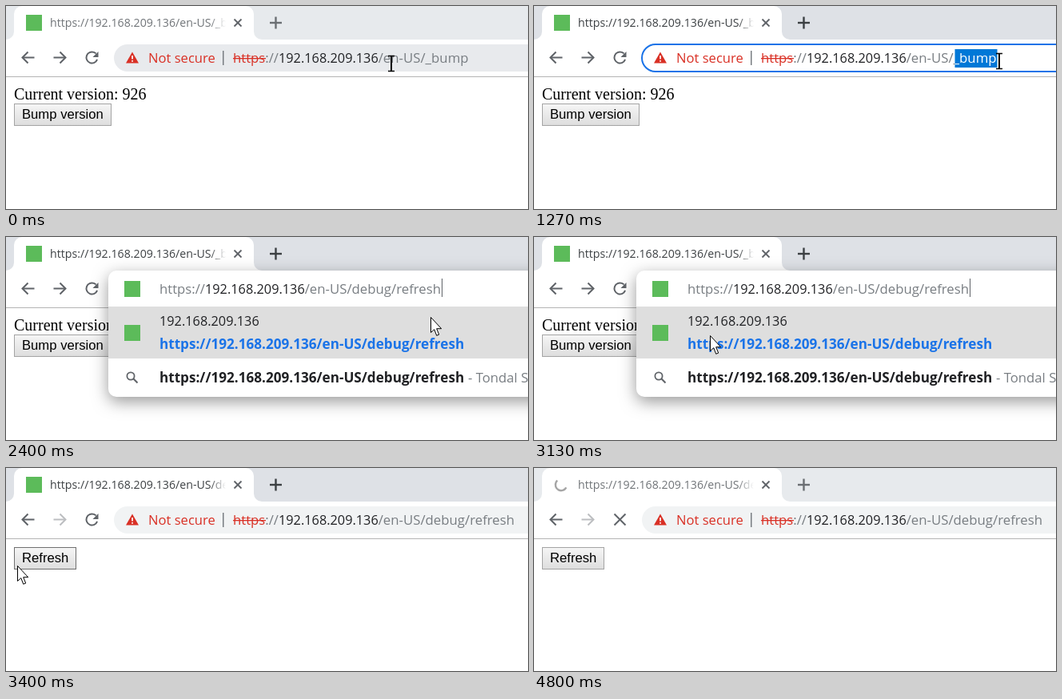
An HTML page with a canvas for the animation above (4.87 s loop, 653 by 254 pixels).

```html
<!DOCTYPE html>
<html lang="en">
<head>
<meta charset="utf-8">
<title>Version bump</title>
<style>
html, body { margin: 0; width: 100%; height: 100%; overflow: hidden; background: #fff; }
canvas { display: block; width: 653px; height: 254px; }
</style>
</head>
<body>
<canvas id="stage"></canvas>
<script>
const W = 653, H = 254, LOOP = 4870, TICKS_PER_MS = 0.015;
const canvas = document.getElementById('stage');
const ctx = canvas.getContext('2d');
const dpr = window.devicePixelRatio || 1;
canvas.width = W * dpr;
canvas.height = H * dpr;

const UI = '"Open Sans", "Noto Sans", sans-serif';
const SERIF = '"Liberation Serif", serif';
const SANS = '"Liberation Sans", sans-serif';
const INK = '#202124', GRAY = '#787d82', ICON = '#5f6368';
const RED = '#d93025', BLUE = '#1a73e8', GREEN = '#5cbb5a';
const HOST = '192.168.209.136';
const OLD_PATH = '/en-US/_bump', NEW_PATH = '/en-US/debug/refresh';

// Moments of change, in ticks of 1/15 s
const FOCUS = 16, PASTE = 31, POPUP = 32, HOVER = 35, CARET_OFF = 39, CARET_ON = 47;
const ENTER = 48, POPUP_GONE = 49, LOADED = 50, PRESS = 59, BLUR = 70;

// Pointer keys: [tick, x, y]
const beamPath = [[0, 482, 72], [4, 464, 66], [8, 490, 69], [9, 490, 69],
  [12, 526, 68], [15, 526, 68], [19, 582, 69]];
const arrowPath = [[35, 571, 92], [36, 531, 100], [38, 240, 122], [47, 220, 123],
  [48, 160.5, 125], [51, 14, 122], [52, 14, 122], [54, 28, 130], [55, 36, 126],
  [56, 42, 117], [60, 42, 117], [65, 92, 222], [66, 98, 256]];

function along(keys, t) {
  const i = keys.findIndex(k => k[0] > t);
  if (i === 0) return keys[0].slice(1);
  if (i < 0) return keys[keys.length - 1].slice(1);
  const a = keys[i - 1], b = keys[i], p = (t - a[0]) / (b[0] - a[0]);
  return [a[1] + (b[1] - a[1]) * p, a[2] + (b[2] - a[2]) * p];
}

function text(str, x, y, size, color, family = UI, weight = 'normal') {
  ctx.font = `${weight} ${size}px ${family}`;
  ctx.fillStyle = color;
  ctx.fillText(str, x, y);
}

function rect(x, y, w, h, color) {
  ctx.fillStyle = color;
  ctx.fillRect(x, y, w, h);
}

function trace(points) {
  ctx.beginPath();
  points.forEach(([x, y]) => ctx.lineTo(x, y));
}

function line(points, color, width = 2) {
  trace(points);
  ctx.strokeStyle = color;
  ctx.lineWidth = width;
  ctx.stroke();
}

function polygon(points, color) {
  trace(points);
  ctx.fillStyle = color;
  ctx.fill();
}

function arc(x, y, r, from, to, color, width) {
  ctx.beginPath();
  ctx.arc(x, y, r, from, to);
  ctx.strokeStyle = color;
  ctx.lineWidth = width;
  ctx.stroke();
}

function cross(x, y, r, color, width) {
  line([[x - r, y - r], [x + r, y + r]], color, width);
  line([[x - r, y + r], [x + r, y - r]], color, width);
}

function siteIcon(x, y) {
  rect(x, y, 20, 20, GREEN);
}

function spinner(ticks) {
  const turned = 2 * Math.PI * ticks / TICKS_PER_MS / 1320;
  const head = 1.5 * Math.PI - turned;
  arc(34, 21, 7.2, head, head + Math.min(turned, 3.5), '#a6a6a6', 2.4);
}

function tabStrip(tick, active, loadStart) {
  rect(0, 0, W, 42, active ? '#dee1e6' : '#e7eaed');
  ctx.beginPath();
  ctx.moveTo(0, 42);
  ctx.arcTo(10, 42, 10, 32, 10);
  ctx.arcTo(10, 0, 20, 0, 10);
  ctx.arcTo(310, 0, 310, 10, 10);
  ctx.arcTo(310, 42, 320, 42, 10);
  ctx.lineTo(320, 42);
  ctx.fillStyle = '#fff';
  ctx.fill();

  if (loadStart === null) siteIcon(25, 11);
  else spinner(tick - loadStart);

  const [r, g, b] = active ? [60, 64, 67] : [112, 116, 120];
  const fade = ctx.createLinearGradient(255, 0, 275, 0);
  fade.addColorStop(0, `rgb(${r},${g},${b})`);
  fade.addColorStop(1, `rgba(${r},${g},${b},0)`);
  const path = tick < LOADED ? OLD_PATH : NEW_PATH;
  ctx.save();
  ctx.beginPath();
  ctx.rect(50, 0, 225, 42);
  ctx.clip();
  text('https://' + HOST + path, 55, 26, 14.2, fade);
  ctx.restore();

  const mark = active ? '#3c4043' : '#6b6f73';
  cross(290, 21, 4.5, ICON, 1.8);
  line([[330, 21], [345, 21]], mark, 2.4);
  line([[337.5, 13.5], [337.5, 28.5]], mark, 2.4);
}

function navButtons(canForward, loading) {
  line([[35.5, 64.5], [20.5, 64.5]], ICON);
  line([[27.5, 57.5], [20.5, 64.5], [27.5, 71.5]], ICON);
  const forward = canForward ? ICON : '#bcbec1';
  line([[59.5, 64.5], [74.5, 64.5]], forward);
  line([[67.5, 57.5], [74.5, 64.5], [67.5, 71.5]], forward);
  if (loading) {
    cross(107.5, 64.5, 7, ICON);
  } else {
    arc(107.5, 64.5, 7, 0.35, 5.5, ICON, 2);
    polygon([[115.5, 57], [115.5, 64], [108.5, 64]], ICON);
  }
}

function address(x, path, insecure) {
  text('https', x, 71, 16.7, insecure ? RED : GRAY);
  text('://', x + 40.3, 71, 16.7, GRAY);
  if (insecure) rect(x, 65, 41, 1.3, RED);
  text(HOST, x + 57, 71, 16.3, INK);
  text(path, x + 181.7, 71, 16.8, GRAY);
}

function pill(fill, focused) {
  ctx.beginPath();
  ctx.roundRect(135, 48, 640, 34, 17);
  ctx.fillStyle = fill;
  ctx.fill();
  if (focused) {
    ctx.strokeStyle = BLUE;
    ctx.lineWidth = 2;
    ctx.stroke();
  }
}

function insecureBox(tick, path) {
  const focused = tick >= FOCUS && tick < PASTE;
  pill(focused ? '#fff' : tick < FOCUS ? '#e8eaed' : '#f1f3f4', focused);
  polygon([[158, 57.5], [166, 71.5], [150, 71.5]], RED);
  rect(157.2, 62, 1.7, 4.5, '#fff');
  rect(157.2, 68, 1.7, 1.7, '#fff');
  text('Not secure', 178, 71, 16.6, RED);
  rect(271, 56, 1.5, 18, GRAY);
  address(284, path, true);
  if (focused) {
    const width = Math.min(53, (tick - 15) * 14);
    ctx.save();
    ctx.beginPath();
    ctx.rect(526.5, 54, width, 23);
    ctx.clip();
    rect(526, 54, 60, 23, '#0078d7');
    text(path, 465.7, 71, 16.8, '#fff');
    ctx.restore();
  }
}

function editBox(caret) {
  siteIcon(148, 55);
  address(192, NEW_PATH, false);
  if (caret) rect(545, 52, 1, 23, ICON);
}

function loadingBox() {
  pill('#f1f3f4', false);
  arc(157.5, 64.5, 7, 0, 2 * Math.PI, ICON, 1.7);
  rect(156.6, 63.5, 1.8, 5, ICON);
  rect(156.6, 60.3, 1.8, 1.8, ICON);
  address(178, NEW_PATH, false);
}

function popup(rowColor, alpha) {
  const url = 'https://' + HOST + NEW_PATH;
  ctx.save();
  ctx.globalAlpha = alpha;
  // A fading popup only tints the page below it
  if (alpha < 1) ctx.globalCompositeOperation = 'multiply';
  ctx.save();
  ctx.shadowColor = `rgba(0,0,0,${0.4 * alpha})`;
  ctx.shadowBlur = 20 * dpr;
  ctx.shadowOffsetY = 6 * dpr;
  ctx.beginPath();
  ctx.roundRect(128, 42, 640, 158, 10);
  ctx.fillStyle = '#fff';
  ctx.fill();
  ctx.restore();
  rect(128, 87, W, 65, rowColor);
  siteIcon(148, 110);
  text(HOST, 192, 111, 16.3, INK);
  text(url, 192, 140, 17.14, BLUE, UI, 'bold');
  arc(156, 174, 4.6, 0, 2 * Math.PI, ICON, 1.8);
  line([[159.3, 177.3], [164.5, 182.5]], ICON);
  text(url, 192, 182, 17.14, INK, UI, 'bold');
  text('- Tondal Search', 578, 182, 16.7, GRAY);
  ctx.restore();
}

function button(label, y, width, hovered, pressed) {
  const shade = ctx.createLinearGradient(0, y, 0, y + 28);
  shade.addColorStop(pressed ? 1 : 0, '#f6f6f6');
  shade.addColorStop(pressed ? 0 : 1, '#dddddd');
  rect(10, y, width, 28, hovered ? '#707070' : '#a4a4a4');
  rect(11, y + 1, width - 2, 26, shade);
  text(label, 20, y + 19, 16.667, '#000', SANS);
}

function page(tick) {
  if (tick < LOADED) {
    text('Current version: 926', 10, 117, 20, '#000', SERIF);
    button('Bump version', 122, 122, false, false);
  } else {
    const [x, y] = along(arrowPath, tick);
    const hovered = x >= 10 && x < 88 && y >= 99 && y < 127;
    button('Refresh', 99, 78, hovered, tick === PRESS);
  }
}

function beam([x, y]) {
  line([[x - 4, y - 9.5], [x + 4, y - 9.5]], '#000', 1.5);
  line([[x, y - 10], [x, y + 10]], '#000', 2);
  line([[x - 4, y + 9.5], [x + 4, y + 9.5]], '#000', 1.5);
}

function arrow([x, y]) {
  const shape = [[0, 0], [0, 19], [4.3, 15.2], [7.2, 22.8], [10.2, 21.6], [7.2, 14.2], [13.2, 14.2]];
  trace(shape.map(([dx, dy]) => [x + 0.5 + dx, y + 0.5 + dy]));
  ctx.closePath();
  ctx.fillStyle = '#fff';
  ctx.fill();
  ctx.strokeStyle = '#000';
  ctx.lineWidth = 1;
  ctx.stroke();
}

function draw(tick) {
  ctx.setTransform(dpr, 0, 0, dpr, 0, 0);
  rect(0, 0, W, H, '#fff');
  const active = tick >= FOCUS && tick < BLUR;
  const loadStart = tick >= PRESS ? PRESS - 0.3
    : tick >= ENTER && tick < LOADED ? ENTER - 0.5 : null;

  tabStrip(tick, active, loadStart);
  navButtons(tick < LOADED, loadStart !== null);
  rect(0, 88, W, 1, '#b5b5b5');
  page(tick);

  if (tick < PASTE) insecureBox(tick, OLD_PATH);
  else if (tick < ENTER) {
    if (tick >= POPUP) popup(tick >= HOVER ? '#dedede' : '#e8e8e8', 1);
    editBox(tick < CARET_OFF || tick >= CARET_ON);
  } else if (tick < LOADED) {
    if (tick < POPUP_GONE) popup('#fff', 0.13);
    loadingBox();
  } else insecureBox(tick, NEW_PATH);

  if (tick < PASTE) beam(along(beamPath, tick));
  else if (tick >= HOVER) arrow(along(arrowPath, tick));
}

function frame() {
  const ms = performance.now() % LOOP;
  draw(Math.min(72, Math.floor((ms + 4) * TICKS_PER_MS)));
  requestAnimationFrame(frame);
}
frame();
</script>
</body>
</html>
```
